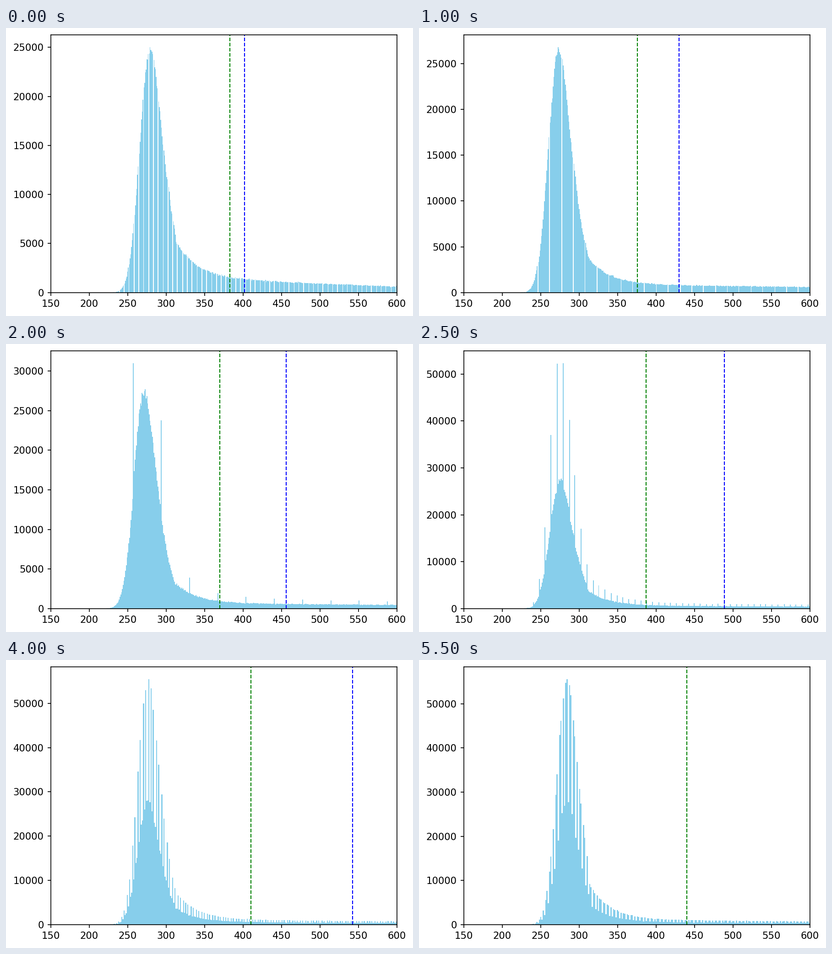
Recreate the animation shown at these times as a matplotlib script. Size 889 px wide and 630 px high, loop 8000 ms.

```python
import numpy as np
import matplotlib.pyplot as plt
from matplotlib.animation import FuncAnimation

W, H, DPI = 889, 630, 152.5
STEP = 500
N_FRAMES = 16
LAST = 11
N_BINS = 1000
KNEE = 313

# Key points, one per listed step
KEY_STEPS = [0, 2, 4, 6, 8, 10, 11]
MAXIMUM = [863, 939, 1028, 1267, 1406, 1585, 1630]
GREEN = [383, 376, 370, 404, 410.4, 428, 440]
BLUE = [402, 430, 456, 522, 542, 598, 612]
PEAK = [280, 274.5, 272.5, 280.5, 277.5, 281, 285.5]

values = np.arange(205, 604)


def at(step, keys):
    return np.interp(step, KEY_STEPS, keys)


def counts(step):
    """Samples at each whole value: a skewed peak, then a long tail."""
    mu = at(step, PEAK)
    top = 28000 - 3000 * np.exp(-step / 2.5)
    d = values - mu
    spread = np.where(d < 0, 19.6, 25.4 - 0.38 * step)
    power = np.where(d < 0, 2.15, 1.53)
    peak = top * np.exp(-(np.abs(d) / spread) ** power)

    past = np.maximum(values - KNEE, 0)
    base = 560 + 960 * np.exp(-step / 2)
    slope = 0.75 + 2.45 * np.exp(-step)
    lift = 153 * (mu - 256) * (1 - 0.01 * step)
    tail = base - slope * past + lift * np.exp(-past / 27)

    c = np.where(values < KNEE, peak, tail)
    noise = np.random.default_rng(40 + step).normal(size=len(c))
    return np.round(np.maximum(c + noise * (0.9 * np.sqrt(c) + 0.005 * c), 0))


def histogram(step):
    """Equal bins from 0 to the maximum; whole values beat against the bins."""
    width = round(at(step, MAXIMUM)) / N_BINS
    edges = np.arange(N_BINS + 1) * width
    h, _ = np.histogram(values, edges, weights=counts(step))
    shown = h > 0
    return edges[:-1][shown], h[shown], width


STATES = [histogram(s) for s in range(LAST + 1)]

fig = plt.figure(figsize=((W + 1e-4) / DPI, (H + 1e-4) / DPI), dpi=DPI,
                 facecolor="white")
ax = fig.add_axes([97.6 / W, 1 - 578.8 / H, 756.4 / W, 563.8 / H])


def draw(i):
    step = min(i, LAST)
    x, h, width = STATES[step]
    ax.cla()
    ax.bar(x, h, width=width, align="edge", color="skyblue")
    for keys, color in ((GREEN, "green"), (BLUE, "blue")):
        ax.axvline(at(step, keys), color=color, linestyle="--", linewidth=1)
    ax.set_xlim(150, 600)
    ax.set_ylim(0, h.max() * 1.05)
    return []


anim = FuncAnimation(fig, draw, frames=N_FRAMES, init_func=lambda: [],
                     interval=STEP, repeat=True, repeat_delay=0, blit=False)
plt.show()
```
